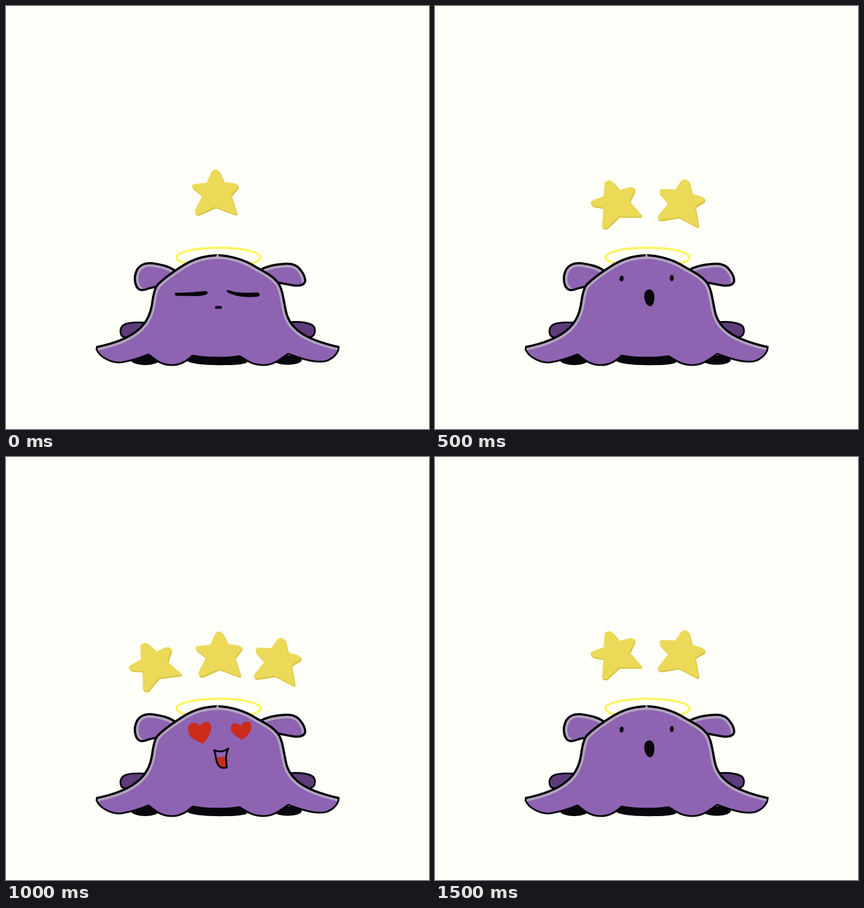
An HTML page for the animation above (2 s loop, 748 by 748 pixels).

```html
<!DOCTYPE html>
<html lang="en">
<head>
<meta charset="utf-8">
<title>Star gazer</title>
<style>
  html, body { margin: 0; width: 100%; height: 100%; overflow: hidden; background: #fefff9; }
  svg { display: block; width: 100%; height: 100%; }
  .ink { fill: none; stroke: #08070b; stroke-width: 4; stroke-linecap: round; stroke-linejoin: round; }
  .thin { stroke-width: 3.2; }
  .glow { fill: none; stroke: #b2a3bf; stroke-width: 12.5; stroke-linecap: round; stroke-linejoin: round; }
  .skin { fill: #8e63b2; }
  .dark { fill: #5e3c7c; }
  .black { fill: #08070b; }
  .red { fill: #cc2b1a; stroke: #c03028; stroke-width: 1.5; stroke-linejoin: round; }
  .rim, .face { stroke-linejoin: round; }
  .rim { fill: #d9c443; stroke: #d9c443; stroke-width: 5.5; }
  .face { fill: #ecd957; stroke: #ecd957; stroke-width: 4.5; }
</style>
</head>
<body>
<svg viewBox="0 0 748 748">
  <defs>
    <path id="body"/>
    <path id="back"/>
    <path id="earL" d="M299 468C286 459 272 457 259 455C246 454 238 457 232 466C227 476 227 486 230 494C233 502 240 504 248 501C255 498 262 497 270 496L299 468Z"/>
    <path id="earR" d="M451 466C463 459 478 457 493 456C507 455 516 459 521 467C526 473 529 480 529 486C528 493 521 495 511 494.5C501 493 492 491 480 489Z"/>
    <clipPath id="inBody"><use href="#body"/></clipPath>
    <clipPath id="inEarL"><use href="#earL"/></clipPath>
    <clipPath id="inEarR"><use href="#earR"/></clipPath>

    <path id="up" d="M366 296Q371 289 376 296L385 315L404 317Q411 318 406 324L396 336L406 367L371 354L342 367Q335 369 338 361L351 336L333 322Q330 318 336 318L357 316Z"/>
    <path id="right" d="M437 313Q443 306 448 314L453 335L471 340Q479 344 471 347L458 355L464 389L432 372L402 377Q393 378 400 370L416 350L401 333Q398 326 406 327L427 328Z"/>
    <path id="left" d="M303 314Q308 309 314 314L327 329L344 324Q354 322 350 330L342 347L363 371L325 371L304 391Q296 394 299 384L301 356L283 353Q273 349 283 346L301 339Z"/>
  </defs>

  <ellipse cx="376" cy="444.5" rx="74.5" ry="17" fill="none" stroke="#fdf45c" stroke-width="3.8"/>

  <g id="feet">
    <path class="dark" d="M248 560C232 559 218 559 210 563C202 567 201 575 204 582C206 586 211 586 216 586L240 575Z"/>
    <path class="dark" d="M502 559C518 558 532 559 541 564C548 568 547 578 544 582C541 586 535 586 529 585L510 575Z"/>
    <path class="ink thin" d="M248 560C232 559 218 559 210 563C202 567 201 575 204 582C206 586 211 586 216 586M502 559C518 558 532 559 541 564C548 568 547 578 544 582C541 586 535 586 529 585"/>
  </g>

  <use href="#earL" class="skin"/>
  <use href="#earR" class="skin"/>
  <path class="glow" clip-path="url(#inEarL)" d="M299 468C286 459 272 457 259 455C246 454 238 457 232 466C227 476 227 486 230 494Q232 499 236 502"/>
  <path class="glow" clip-path="url(#inEarR)" d="M451 466C463 459 478 457 493 456C507 455 516 459 521 467C526 473 529 480 529 486"/>
  <use href="#earL" class="ink"/>
  <use href="#earR" class="ink"/>

  <g class="black">
    <ellipse cx="246" cy="626" rx="25" ry="9"/>
    <ellipse cx="498" cy="626" rx="25" ry="8.5"/>
    <path d="M319 627L332 616H412L427 630Q418 635 390 635Q345 636 325 630Z"/>
  </g>

  <use href="#body" class="skin"/>
  <g clip-path="url(#inBody)"><use href="#back" class="glow"/></g>
  <use href="#body" class="ink thin"/>
  <use href="#back" class="ink"/>
  <path class="glow" style="stroke-width:2" d="M372 444L374 440L376 444"/>

  <g id="asleep" class="black">
    <path d="M300 507Q322 507 340 505L353 504Q358 505 356 509Q352 512 338 513L302 512.5Q296 511 300 507Z"/>
    <path d="M391 502.5Q395 502 402 505Q414 508 445 506.5Q450 509 448 512.5Q444 515.5 424 514.5Q405 513.5 393 507Q389 505 391 502.5Z"/>
    <rect x="369.5" y="530.5" width="12.5" height="5" rx="2.4"/>
  </g>

  <g id="amazed" class="black">
    <ellipse cx="330" cy="482" rx="3.6" ry="5.4" transform="rotate(10 330 482)"/>
    <ellipse cx="418.8" cy="481" rx="3.6" ry="5.4"/>
    <path d="M379 501C385 501 388 508 388 515C388 524 385 531 380 531C374 530 370 521 370 514C370 506 373 502 379 501Z"/>
  </g>

  <g id="loving">
    <path class="red" d="M348 506C339 502 325 498 323 486C321 475 326 470 333 471C338 471 341 474 343 478C346 470 352 468 358 470C364 473 363 482 360 489C357 496 352 502 348 506Z"/>
    <path class="red" d="M417 499C409 495 399 489 398 480C398 473 403 470 409 472Q413 474 415 477C418 470 424 467 430 469C435 472 434 481 430 487Q425 494 417 499Z"/>
    <path class="red" d="M372 533Q380 529 388 532L390 549L382 549Q374 545 372 533Z"/>
    <path class="ink thin" d="M368 518.5Q381 524 393 515.5Q389 524 389 533L390.5 549Q382 551 378 547.5Q373 543 371.5 534Q371 526 368 518.5Z"/>
  </g>

  <g id="stars"></g>
</svg>
<script>
const $ = id => document.getElementById(id);
const STEP = 500;
const moods = ["asleep", "amazed", "loving"];

const back = "M161 603C185 598 212 590 231 575C252 559 257 538 259 522C261 508 264 498 268 493" +
  "C281 480 300 467 318 456C334 447 355 441 374 441C394 441 421 448 441 461" +
  "C455 469 470 476 480 488C490 500 491 525 496 544C504 572 530 590 588 603";
const hem = "C589 612 579 624 565 628C545 632 518 622 499 615C488 622 475 635 455 635" +
  "C436 635 426 627 413 619C390 623 352 623 330 618C318 630 306 635 293 635" +
  "C275 635 264 626 252 616C238 622 222 627 205 630C188 632 166 622 160 607Z";
$("back").setAttribute("d", back);
$("body").setAttribute("d", back + hem);

// star shape, dx, dy, turn
const poses = [
  [["up", 0, 0, 0]],
  [["left", 0, 0, 0], ["right", 0, 0, 0]],
  [["left", -58, 19, -7], ["up", 6.5, 19.5, 0], ["right", 44.5, 13.5, 0]]
];
const order = [0, 1, 2, 1];

const star = ([shape, x, y, turn]) =>
  `<g transform="translate(${x} ${y}) rotate(${turn} 322 350)">
    <use href="#${shape}" class="rim" x="0.6" y="0.8"/>
    <use href="#${shape}" class="face" x="-0.8" y="-1.2"/>
  </g>`;

$("stars").innerHTML = poses.map(set => `<g>${set.map(star).join("")}</g>`).join("");
const groups = [...$("stars").children];

const start = performance.now();
function draw(now) {
  const t = Math.max(0, now - start);
  const pose = order[Math.floor(t / STEP) % order.length];
  moods.forEach((id, i) => {
    const shown = i === pose ? "inline" : "none";
    $(id).style.display = shown;
    groups[i].style.display = shown;
  });
  requestAnimationFrame(draw);
}
draw(start);
</script>
</body>
</html>
```
